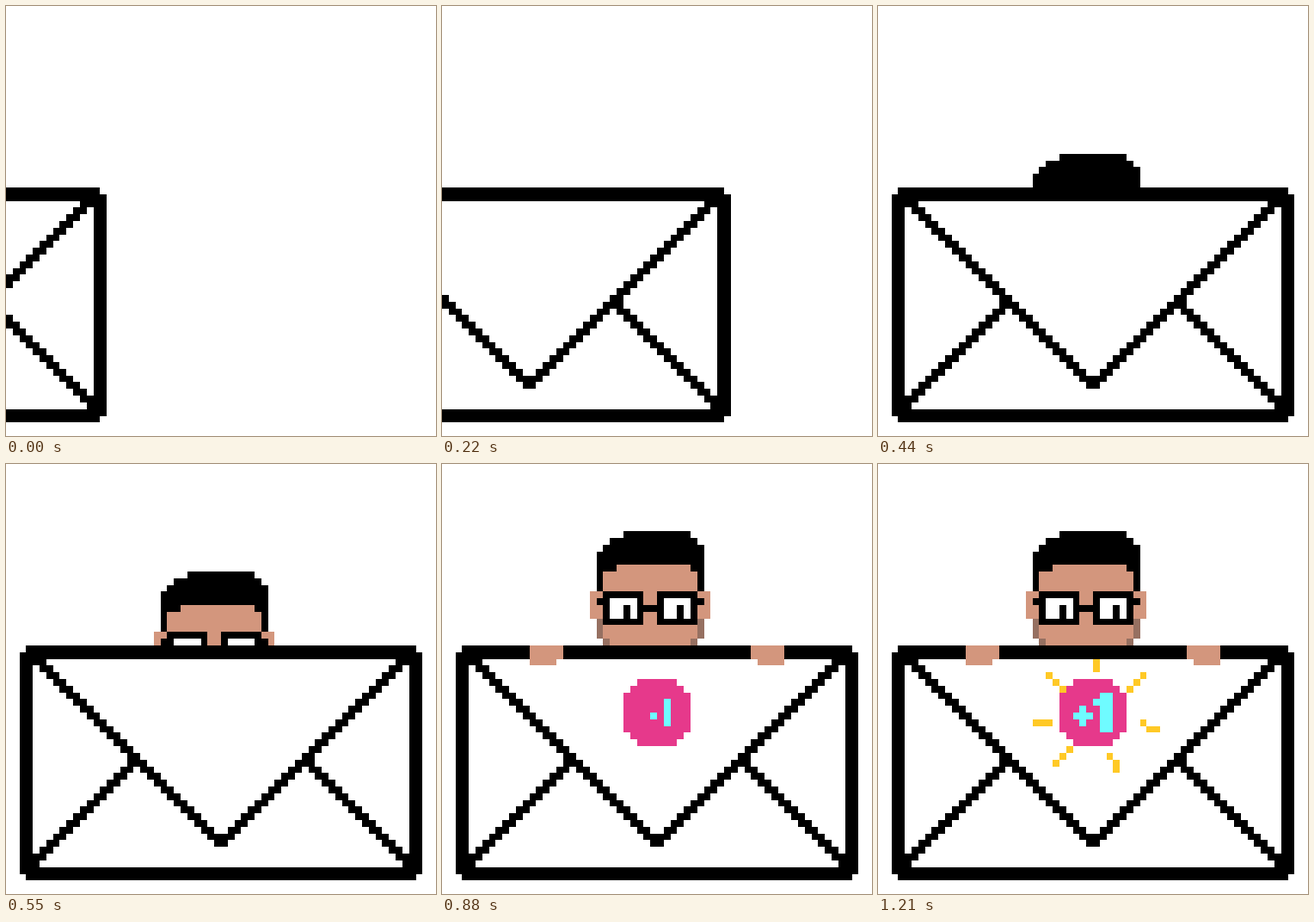
These frames come from a looping animation (500x500 px, 1320 ms). An HTML page with a canvas:

```html
<!DOCTYPE html>
<html lang="en">
<head>
<meta charset="utf-8">
<title>Pixel envelope</title>
<style>
html, body { margin: 0; width: 100%; height: 100%; overflow: hidden; background: #fff; }
canvas { display: block; width: 100vw; height: 100vh; image-rendering: pixelated; }
</style>
</head>
<body>
<canvas id="stage" width="500" height="500"></canvas>
<script>
const ctx = document.getElementById('stage').getContext('2d');
const GRID = 64, CELL = 500 / GRID, STEP = 110, STEPS = 12;
const INK = '#000', PAPER = '#fff', SKIN = '#d3967d', SHADE = '#967061';
const PINK = '#e6398b', CYAN = '#6ffbff', GOLD = '#ffc926';
const RAY_ANGLES = [-90, -42, 12, 70, 128, 172, 222];

// Grid cells to whole pixels, halves rounded down.
const px = v => Math.ceil(v * CELL - 0.5);

function box(color, x, y, w, h) {
  ctx.fillStyle = color;
  ctx.fillRect(px(x), px(y), px(x + w) - px(x), px(y + h) - px(y));
}

// A box and its mirror image in a figure whose two edges add up to sum.
function pair(color, sum, x, y, w, h) {
  box(color, x, y, w, h);
  box(color, sum - x - w, y, w, h);
}

function envelope(dx) {
  const both = (x, y, w, h) => pair(INK, GRID + 2 * dx, x + dx, y, w, h);
  box(PAPER, 3 + dx, 28, 58, 33);
  box(INK, 3 + dx, 27, 58, 2);
  box(INK, 3 + dx, 60, 58, 2);
  both(2, 28, 2, 33);
  for (let y = 29; y < 57; y++) both(y - 25, y, 2, 1);
  for (let y = 44; y < 60; y++) both(62 - y, y, 2, 1);
}

function head(top) {
  const one = (color, x, y, w, h) => box(color, x, top + y, w, h);
  const both = (color, x, y, w, h) => pair(color, 62, x, top + y, w, h);

  for (let y = 0; y < 9; y++) {
    const left = 23 + (4 >> y), right = 39 - (2 >> y);
    one(INK, left, y, right - left, 1);
  }
  one(SKIN, 26, 5, 11, 1);
  one(SKIN, 24, 6, 14, 11);
  both(SKIN, 22, 9, 2, 4);
  both(SHADE, 23, 13, 1, 3);
  both(SHADE, 24, 16, 1, 1);

  // Glasses
  both(INK, 23, 10, 1, 1);
  one(INK, 30, 11, 2, 1);
  for (const x of [24, 32]) {
    one(INK, x, 9, 6, 5);
    one(PAPER, x + 1, 10, 4, 3);
    one(INK, x + 3, 11, 1, 2);
  }
}

function hands() {
  pair(SKIN, GRID, 13, 27, 5, 2);
  pair(SKIN, GRID, 13, 29, 4, 1);
}

function disc(r, cy) {
  for (let k = 0; k < r; k++) {
    const half = Math.min(r, k + Math.ceil(r / 2));
    box(PINK, 32 - half, cy - r + k, 2 * half, 1);
    box(PINK, 32 - half, cy + r - k - 1, 2 * half, 1);
  }
}

// The label starts as a dot and a bar (grow 0) and ends as "+1" (grow 1).
function plusOne(grow) {
  box(CYAN, 31 - 2 * grow, 37, 1 + 2 * grow, 1);
  box(CYAN, 33, 35 - grow, 1 + grow, 4 + 2 * grow);
  box(CYAN, 30, 36, grow, 3);
  box(CYAN, 32, 35, grow, 1);
}

function rays(inner) {
  for (const deg of RAY_ANGLES) {
    const a = deg * Math.PI / 180;
    for (let r = inner; r < inner + 3; r++) {
      const x = 32.5 + r * Math.cos(a), y = 37.5 + 0.94 * r * Math.sin(a);
      box(GOLD, Math.floor(x), Math.floor(y), 1, 1);
    }
  }
}

function draw(step) {
  box(PAPER, 0, 0, GRID, GRID);
  if (step > 3) head(Math.max(10, 46 - 6 * step));
  envelope(step < 3 ? 14 * step - 47 : 0);
  if (step < 6) return;
  hands();
  disc(Math.min(5, 2 * step - 10), Math.min(37, step + 30));
  if (step > 7) plusOne(Math.min(1, step - 8));
  if (step > 9) rays(18 - step);
}

const start = performance.now();
function tick() {
  draw(Math.floor((performance.now() - start) / STEP) % STEPS);
  requestAnimationFrame(tick);
}
tick();
</script>
</body>
</html>
```
